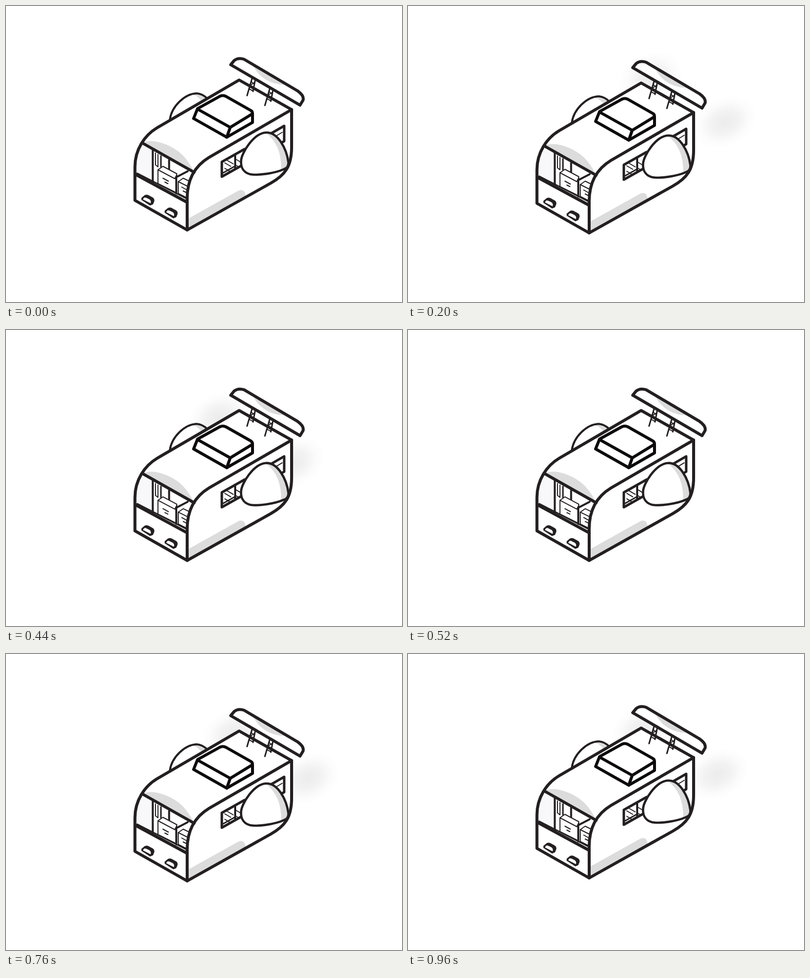
These frames come from a looping animation (800 by 600 pixels, 1000 ms). An HTML page:

```html
<!DOCTYPE html>
<html lang="en">
<head>
<meta charset="utf-8">
<title>Hovering camper</title>
<style>
html, body { margin: 0; width: 100%; height: 100%; overflow: hidden; background: #fff; }
svg { display: block; width: 100vw; height: 100vh; }
.ink { fill: none; stroke: #231f20; stroke-width: 6; stroke-linejoin: round; stroke-linecap: round; }
.paper { fill: #fff; }
.fin { stroke-width: 4.6; }
.mid { stroke-width: 4; }
.slim { stroke-width: 3; }
.thin { stroke-width: 2; }
.hatch { stroke: #0d0b0c; }
.shade { fill: #dcdcdc; }
.glass { fill: #f8f8fa; }
.solid { fill: #231f20; }
</style>
</head>
<body>
<svg viewBox="0 0 800 600">
  <defs>
    <radialGradient id="puff">
      <stop offset="0" stop-color="#000" stop-opacity=".075"/>
      <stop offset=".4" stop-color="#000" stop-opacity=".052"/>
      <stop offset=".75" stop-color="#000" stop-opacity=".014"/>
      <stop offset="1" stop-color="#000" stop-opacity="0"/>
    </radialGradient>
    <clipPath id="opening"><path d="M276 278L381 337Q366 358 366 394L261 340Q260 303 276 278Z"/></clipPath>
    <clipPath id="sideGlass"><path d="M436 316L482 290V320L436 346Z"/></clipPath>
    <g id="lamp">
      <path class="solid" d="M273.500 393V389L280 383.500Q284 381.500 288 383.500L297 388.500Q300.500 391 299.500 396L297 402L291 404.500Z"/>
      <path class="paper" d="M276.500 392L279 388.500Q281 387.500 285 389.500L290 392Q294 395 292 400Z"/>
    </g>
    <g id="strut">
      <path class="ink slim" d="M497 147L487 181.500M503 152L499 173"/>
      <path class="ink thin" d="M495 153L501 158M493 161L502 155M491 168L499 172M493 161L500 165"/>
    </g>
  </defs>

  <g id="smoke" fill="url(#puff)">
    <ellipse rx="68" ry="50" transform="translate(580 268) rotate(-25)"/>
    <ellipse rx="68" ry="50" transform="translate(430 178) rotate(-25)"/>
  </g>

  <g id="camper">
    <!-- far fin -->
    <path class="paper" d="M331 230C335 203 361 178 385 177Q397 178 408 189Z"/>
    <path class="shade" d="M376 179Q390 183 396 195L408 189Q396 176 376 179Z"/>
    <path class="ink mid" d="M331 230C335 203 361 178 385 177Q397 178 406 187"/>

    <!-- body -->
    <path class="paper" d="M366 454L260.500 394V326C260.500 291 280 262 305 247L471 150L577 210V286C577 326 563 343 535 359Z"/>
    <path class="shade" d="M278 277Q291 271 309 276C346 286 366 307 379 335Z"/>
    <path class="shade" d="M368 431L470 374Q478 371 482 377L485 386L368 452Z"/>

    <!-- front window -->
    <g clip-path="url(#opening)">
      <path class="glass" d="M255 265H295V365H255Z"/>
      <path class="ink mid" d="M296.500 289V357M329.500 312V331"/>
      <path class="ink thin" d="M302 298V322L307 326V301"/>
      <path class="ink slim" d="M313 304V326"/>
      <path class="ink mid" d="M344 347L367 335"/>
      <path class="ink paper thin" d="M307 332L317 325L345 340V379L307 360Z"/>
      <path class="ink thin" d="M307 332L341 350L345 342M317 349L328 355M321 357L327 360"/>
      <path class="ink paper thin" d="M348 356L358 349L380 360V396L348 380Z"/>
      <path class="ink thin" d="M348 356L370 367M355 367L364 372M358 375L366 379"/>
      <path class="ink mid" d="M344 347V380"/>
    </g>
    <path class="ink" d="M276 278L380 337"/>
    <path class="ink" d="M262 341.500L366 398"/>
    <path class="ink slim" d="M265 339L366 391"/>
    <use href="#lamp"/>
    <use href="#lamp" x="47" y="26"/>

    <!-- side windows -->
    <g clip-path="url(#sideGlass)">
      <path class="ink mid" d="M463 300V334"/>
      <path class="ink thin" d="M442 318L454 325M447 313L459 320M442 329L452 335M465 311L475 317M465 323L475 329"/>
      <path class="ink slim" d="M439 338L462 325"/>
    </g>
    <path class="ink" style="stroke-width:5" d="M482 290L436 316V346L482 320"/>
    <path class="ink" style="stroke-width:5" d="M536 258L562 243V274L548 282"/>
    <path class="ink thin" d="M545 264L558 256"/>

    <!-- body outline -->
    <path class="ink" d="M366 454L260.500 394V326C260.500 291 280 262 305 247L471 150L577 210V286C577 326 563 343 535 359Z"/>
    <path class="ink" d="M366 454V390C366 351 382 324 410 307L577 210"/>

    <!-- near fin -->
    <path class="paper" d="M475 313C476 298 500 258 525 256.500C549 255 567 289 570.500 317Q571 328 561 331C543 339 510 344 493 341C478 337 474 325 475 313Z"/>
    <path class="shade" d="M524 257C548 255 567 289 570.500 317Q571 328 561 331L556 333Q557 280 524 257Z"/>
    <path class="ink fin" d="M475 313C476 298 500 258 525 256.500C549 255 567 289 570.500 317Q571 328 561 331C543 339 510 344 493 341C478 337 474 325 475 313Z"/>

    <!-- roof hatch -->
    <path class="ink paper hatch" d="M387 208L432 183Q438 180 444 183L495 212Q498 214 498 218V236L446 266L379 228Z"/>
    <path class="ink hatch" d="M387 209L453 246L497 219M453 246L446 266"/>

    <!-- spoiler -->
    <use href="#strut"/>
    <use href="#strut" x="36" y="20"/>
    <path class="paper" d="M454 119L461 110.500Q469 104 481 108L589 172Q603 182 600 191L594 201Z"/>
    <path class="shade" d="M498 119L567 160Q519 160 498 119Z"/>
    <path class="ink" d="M454 119L461 110.500Q469 104 481 108L589 172Q603 182 600 191L594 201Z"/>
  </g>
</svg>
<script>
const LOOP = 1000, STEP = 40;
const camper = document.getElementById('camper');
const smoke = document.getElementById('smoke');

// Rises linearly from 0 to 1 at the peak, then falls back at the same rate.
const triangle = (t, peak) => Math.max(0, 1 - Math.abs(t - peak) / peak);

function draw(ms) {
  const t = Math.floor((ms % LOOP) / STEP) * STEP;
  camper.setAttribute('transform', `translate(0 ${14.4 * triangle(t, 480)})`);

  const puff = t % 640;
  const drift = 90 * triangle(puff, 240) - 15;
  smoke.setAttribute('transform', `translate(${drift} ${-0.55 * drift})`);
  smoke.setAttribute('opacity', puff > 0 && puff < 480 ? 1 : 0);
}

const start = performance.now();
function tick() {
  draw(performance.now() - start);
  requestAnimationFrame(tick);
}
tick();
</script>
</body>
</html>
```
